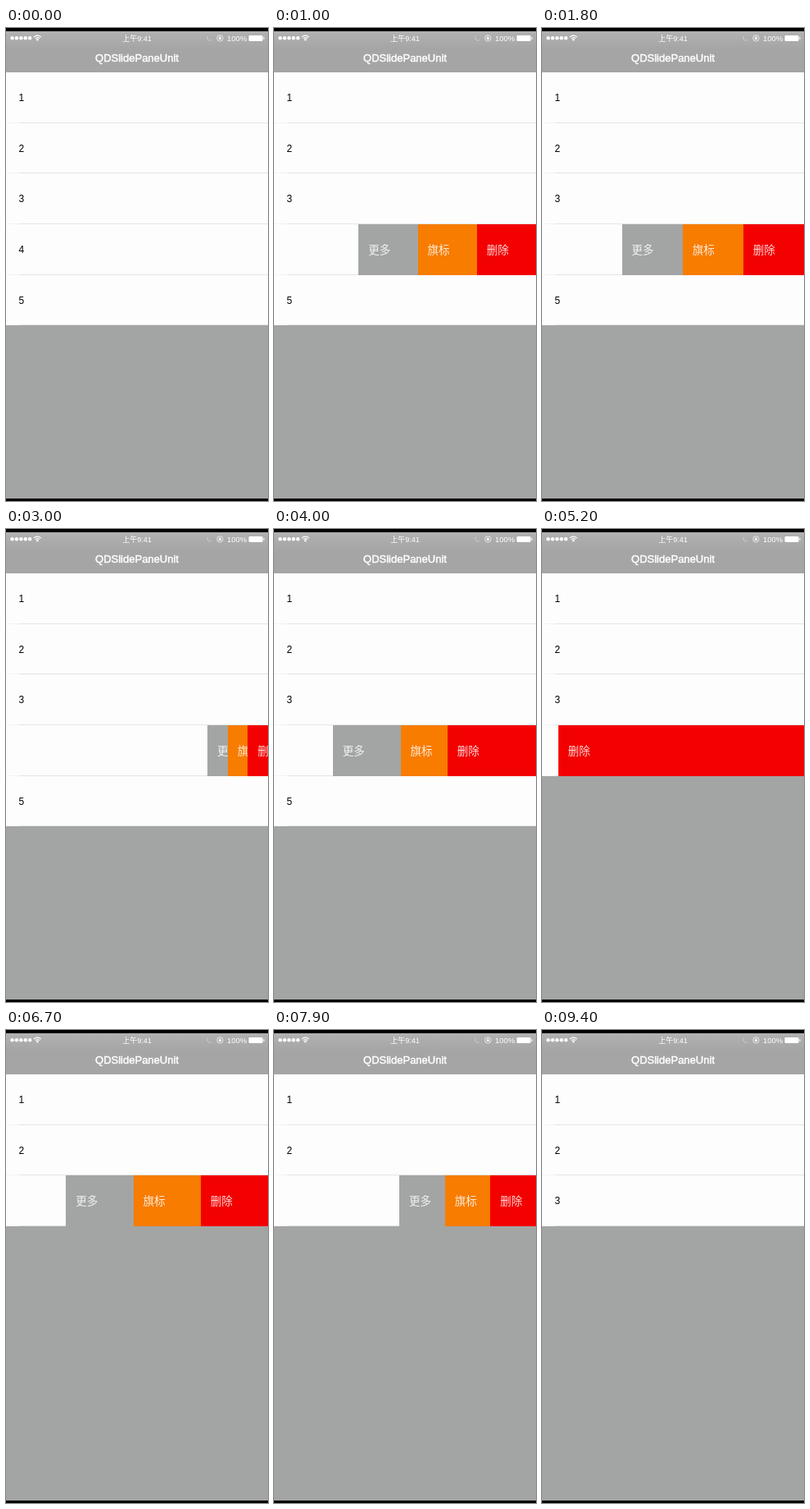
An HTML page with a canvas for the animation above (9.7 s loop, 320 by 576 pixels).

```html
<!DOCTYPE html>
<html lang="zh">
<head>
<meta charset="utf-8">
<style>
html, body { margin: 0; width: 100%; height: 100%; overflow: hidden; background: #000; }
canvas { display: block; }
</style>
</head>
<body>
<canvas id="stage" width="320" height="576"></canvas>
<script>
const ctx = document.getElementById('stage').getContext('2d');
const LOOP = 9700, STEP = 100, TOP = 53.4, ROW = 61.7;
const DELETE_AT = [3700, 4772], DELETE_TIME = 720;
const GRAY = '#a3a5a4', ORANGE = '#f77c00', RED = '#f30000', PAPER = '#fdfdfd';
const LATIN = '"Liberation Sans", sans-serif';
const HAN = '"Noto Sans CJK SC", "Noto Sans CJK", sans-serif';

const ramp = (t, from, to) => Math.min(1, Math.max(0, (t - from) / (to - from)));
const easeOut = (t, from, to) => 1 - (1 - ramp(t, from, to)) ** 2;
function smooth(t, from, to) {
  const p = ramp(t, from, to);
  return p * p * (3 - 2 * p);
}

// Revealed width while a row is dragged open, eased back and closed again
function peek(t) {
  if (t < 3600) {
    return 258 * easeOut(t, 400, 1400) - 35.5 * easeOut(t, 1400, 1800)
      - 56 * smooth(t, 1900, 2900) - 166.5 * easeOut(t, 2900, 3200);
  }
  return 257 * easeOut(t, 5900, 6900) - 90 * smooth(t, 6900, 7900)
    - 83 * smooth(t, 7900, 8400) - 84 * easeOut(t, 8500, 8900);
}

// Full swipe: the row opens, the delete button takes over, the row collapses
function rowState(t) {
  const start = DELETE_AT.find(s => t >= s && t < s + DELETE_TIME);
  if (start === undefined) return { width: peek(t), growth: 0, shift: 0 };
  const age = t - start;
  return {
    width: 320 * easeOut(age, 0, 570),
    growth: ramp(age, 280, 410),
    shift: ROW * smooth(age, 420, DELETE_TIME)
  };
}

function box(color, x, y, w, h) {
  ctx.fillStyle = color;
  ctx.fillRect(x, y, w, h);
}

function text(str, x, y, font, color = '#fff', align = 'left') {
  ctx.font = font;
  ctx.fillStyle = color;
  ctx.textAlign = align;
  ctx.fillText(str, x, y);
}

function disc(x, y, r) {
  ctx.beginPath();
  ctx.arc(x, y, r, 0, 7);
  ctx.fill();
}

function drawButtons(y, width, growth) {
  const w = width / 3, left = 320 - width;
  const del = w + (width - w) * growth;
  const top = Math.floor(y), h = Math.floor(y + ROW) + 1 - top;
  [['更多', GRAY, left], ['旗标', ORANGE, left + w], ['删除', RED, 320 - del]]
    .forEach(([label, color, edge]) => {
      const x = Math.round(edge);
      box(color, x, top, 320 - x, h);
      text(label, edge + 12, y + 36.5, '300 13.5px ' + HAN, 'rgba(255,255,255,.85)');
    });
}

function drawRow(label, y, { width, growth }) {
  const line = Math.floor(y + ROW);
  box(PAPER, 0, y, 320, line - y);
  box('#f3f3f3', 0, line, 16, 1);
  box('#e4e4e4', 16, line, 304, 1);
  text(label, 15.5 - width, y + 35.5, '12px ' + LATIN, '#000');
  if (width > 0) drawButtons(y, width, growth);
}

function drawStatus() {
  ctx.fillStyle = '#fff';
  for (let i = 0; i < 5; i++) disc(7.6 + i * 5.4, 12.3, 2.2);

  ctx.strokeStyle = '#fff';
  ctx.lineWidth = 1.3;
  for (const r of [3.2, 5.8]) {
    ctx.beginPath();
    ctx.arc(38.3, 15, r, -Math.PI * 0.77, -Math.PI * 0.23);
    ctx.stroke();
  }
  disc(38.3, 14.3, 1.2);

  text('上午9:41', 160, 16, '9px "Liberation Sans", ' + HAN, '#fff', 'center');

  ctx.lineWidth = 0.8;
  ctx.strokeStyle = '#d8d8d8';
  ctx.beginPath();
  ctx.arc(249, 12, 3.2, 1, 3.9);
  ctx.stroke();
  ctx.strokeStyle = '#f4f4f4';
  ctx.beginPath();
  ctx.arc(261.3, 12.4, 3.7, 0, 7);
  ctx.stroke();
  box('#f4f4f4', 259.8, 12, 3, 2);
  ctx.strokeRect(260.6, 10.8, 1.4, 1.4);

  text('100%', 270, 15.8, '9.5px ' + LATIN);
  ctx.beginPath();
  ctx.roundRect(296.5, 9, 17, 7, 1.3);
  ctx.fill();
  box('#fff', 314.3, 11.2, 1.2, 2.6);
}

function drawHeader() {
  const shade = ctx.createLinearGradient(0, 4, 0, 26);
  shade.addColorStop(0, '#b3b1b3');
  shade.addColorStop(1, '#a4a5a4');
  box(shade, 0, 4, 320, 50);
  drawStatus();
  text('QDSlidePaneUnit', 160, 41, '13px ' + LATIN, '#fff', 'center');
  ctx.strokeStyle = '#fff';
  ctx.lineWidth = 0.45;
  ctx.strokeText('QDSlidePaneUnit', 160, 41);
}

function draw(t) {
  const labels = [1, 2, 3, 4, 5];
  for (const s of DELETE_AT) if (t >= s + DELETE_TIME) labels.splice(3, 1);
  const active = Math.min(3, labels.length - 1);
  const state = rowState(t), rest = { width: 0, growth: 0 };

  box(GRAY, 0, 0, 320, 576);
  // Upper rows cover the ones that slide up beneath them
  for (let i = labels.length - 1; i >= 0; i--) {
    const y = TOP + i * ROW - (i >= active ? state.shift : 0);
    drawRow(labels[i], y, i === active ? state : rest);
  }
  drawHeader();
  box('#000', 0, 0, 320, 4);
  box('#000', 0, 573, 320, 3);
}

const start = performance.now();
function tick() {
  const t = (performance.now() - start) % LOOP;
  draw(Math.floor(t / STEP) * STEP);
  requestAnimationFrame(tick);
}
tick();
</script>
</body>
</html>
```
